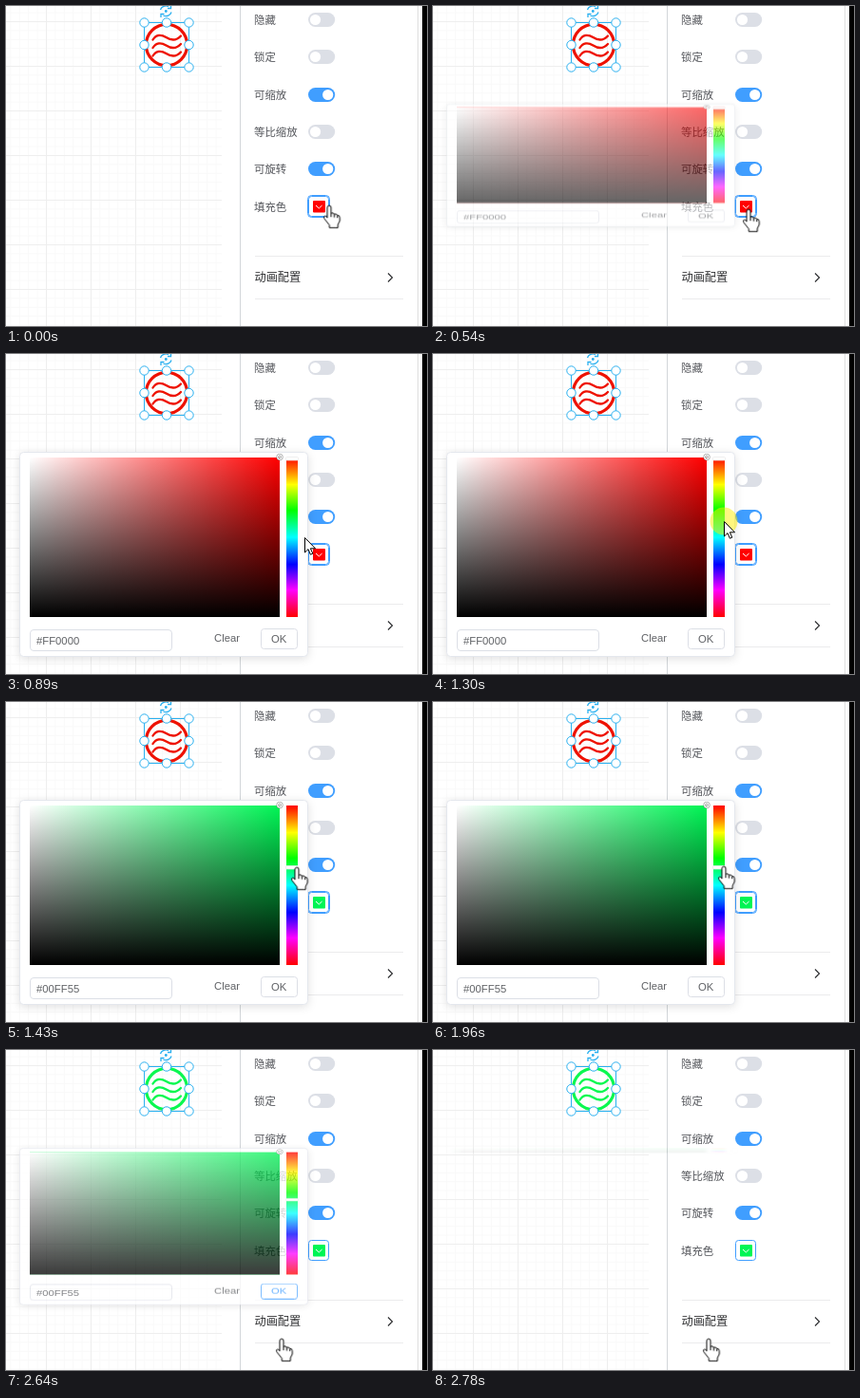
An HTML page for the animation above (3.53 s loop, 443 by 337 pixels).

```html
<!DOCTYPE html>
<html lang="zh-CN">
<head>
<meta charset="utf-8">
<title>Fill colour picker</title>
<style>
  html, body { margin: 0; width: 100%; height: 100%; overflow: hidden; background: #fff; }
  svg { display: block; width: 443px; height: 337px; }
  text { font: 11.4px "Noto Sans CJK SC", "Noto Sans CJK", "Noto Sans", sans-serif; fill: #55575c; }
  .popup text { font: 11.3px "Liberation Sans", Arial, sans-serif; fill: #606266; }
  .title { font-size: 12.2px; font-weight: 500; fill: #303133; }
  .off { fill: #dcdfe6; }
  .on { fill: #409eff; }
  .rule { stroke: #ebebed; }
  .box { fill: #fff; stroke: #dcdfe6; }
  .handles { fill: #fff; stroke: #29b0f0; }

  /* every animated part shares one stepped clock */
  .popup, .pick, .icon, .focus, .thumb, .hexOld, .hexNew, .ok, .popup .okText,
  .cursor, .hand, .arrow, .click { animation: 3530ms step-end infinite; }

  .popup { transform-origin: 0 103px; filter: drop-shadow(0 2px 5px rgba(0,0,0,.12)); animation-name: popup; }
  .pick { animation-name: pick; }
  .icon { animation-name: icon; }
  .focus { animation-name: focus; }
  .thumb { animation-name: thumb; }
  .hexOld { animation-name: before; }
  .hexNew { animation-name: after; }
  .ok { animation-name: ok; }
  .popup .okText { animation-name: okText; }
  .cursor { animation-name: cursor; }
  .hand { animation-name: hand; }
  .arrow { animation-name: arrow; }
  .click { animation-name: click; }

  @keyframes popup {
    0% { transform: scaleY(0); opacity: 0; }
    15.29% { transform: scaleY(.6); opacity: .6; }
    17.28% { transform: scaleY(.92); opacity: .92; }
    19.26% { transform: scaleY(.986); opacity: .986; }
    21.24% { transform: scaleY(.998); opacity: 1; }
    23.22% { transform: none; opacity: 1; }
    74.78% { transform: scaleY(.767); opacity: .767; }
    76.77% { transform: scaleY(.15); opacity: .15; }
    78.75%, 100% { transform: scaleY(.03); opacity: .05; }
  }
  @keyframes pick { 0% { fill: #f00; } 40.5%, 100% { fill: #00f555; } }
  @keyframes icon { 0% { stroke: #ee1200; } 74.78%, 100% { stroke: #0af850; } }
  @keyframes focus { 0% { opacity: 1; } 74.78%, 100% { opacity: 0; } }
  @keyframes thumb { 0% { transform: none; } 40.5%, 100% { transform: translateY(64px); } }
  @keyframes before { 0% { opacity: 1; } 40.5%, 100% { opacity: 0; } }
  @keyframes after { 0% { opacity: 0; } 40.5%, 100% { opacity: 1; } }
  @keyframes ok { 0% { stroke: #dcdfe6; } 67.13%, 100% { stroke: #409eff; } }
  @keyframes okText { 0% { fill: #606266; } 67.13%, 100% { fill: #409eff; } }
  @keyframes cursor {
    0% { transform: translate(340px, 211px); }
    1.98% { transform: translate(337px, 213px); }
    3.96% { transform: translate(333px, 214px); }
    5.66% { transform: translate(332px, 215px); }
    21.24% { transform: translate(329px, 212px); }
    23.22% { transform: translate(321px, 203px); }
    25.21% { transform: translate(314px, 193px); }
    27.19% { transform: translate(311px, 187px); }
    29.17% { transform: translate(308px, 181px); }
    30.87% { transform: translate(306px, 178px); }
    32.86% { transform: translate(306px, 176px); }
    40.5% { transform: translate(306px, 175px); }
    55.52% { transform: translate(306px, 174px); }
    57.5% { transform: translate(306px, 181px); }
    59.49% { transform: translate(304px, 202px); }
    61.18% { transform: translate(300px, 231px); }
    63.17% { transform: translate(296px, 262px); }
    65.15% { transform: translate(293px, 284px); }
    67.13% { transform: translate(291px, 298px); }
    69.12%, 100% { transform: translate(290px, 305px); }
  }
  @keyframes hand { 0% { opacity: 1; } 23.22% { opacity: 0; } 40.5%, 100% { opacity: 1; } }
  @keyframes arrow { 0% { opacity: 0; } 23.22% { opacity: 1; } 40.5%, 100% { opacity: 0; } }
  @keyframes click {
    0% { opacity: 0; } 11.33% { opacity: .5; } 15.29% { opacity: 0; }
    36.82% { opacity: .5; } 40.5% { opacity: 0; }
    71.1% { opacity: .5; } 74.78%, 100% { opacity: 0; }
  }
</style>
</head>
<body>
<svg viewBox="0 0 443 337">
  <defs>
    <pattern id="minor" x="42" y="16" width="9.4" height="9.4" patternUnits="userSpaceOnUse">
      <path d="M.5 0V9.4M0 .5H9.4" stroke="#f9f9f9"/>
    </pattern>
    <pattern id="major" x="42" y="16" width="47" height="47" patternUnits="userSpaceOnUse">
      <path d="M.5 0V47M0 .5H47" stroke="#eee"/>
    </pattern>
    <linearGradient id="white">
      <stop stop-color="#fff"/><stop offset="1" stop-color="#fff" stop-opacity="0"/>
    </linearGradient>
    <linearGradient id="black" x2="0" y2="1">
      <stop stop-opacity="0"/><stop offset="1"/>
    </linearGradient>
    <linearGradient id="hue" x2="0" y2="1">
      <stop stop-color="#f00"/><stop offset=".17" stop-color="#ff0"/>
      <stop offset=".33" stop-color="#0f0"/><stop offset=".5" stop-color="#0ff"/>
      <stop offset=".67" stop-color="#00f"/><stop offset=".83" stop-color="#f0f"/>
      <stop offset="1" stop-color="#f00"/>
    </linearGradient>
    <g id="off"><rect class="off" width="28.2" height="15" rx="7.5"/><circle cx="7.5" cy="7.5" r="5.6" fill="#fff"/></g>
    <g id="on"><rect class="on" width="28.2" height="15" rx="7.5"/><circle cx="20.7" cy="7.5" r="5.6" fill="#fff"/></g>
    <path id="wave" d="M154.5 35.5C158 30 163 29.5 168.500 33S179 37 184 31.5"/>
    <circle id="dot" r="4.7"/>
  </defs>

  <!-- canvas -->
  <rect width="227" height="337" fill="url(#minor)"/>
  <rect width="227" height="337" fill="url(#major)"/>
  <g class="icon" fill="none" stroke-linecap="round">
    <circle cx="169" cy="41" r="21.6" stroke-width="3.2"/>
    <g stroke-width="2.3"><use href="#wave"/><use href="#wave" y="8.5"/><use href="#wave" y="17"/></g>
  </g>
  <g class="handles">
    <rect x="145.5" y="17.5" width="47" height="47" fill="none"/>
    <use href="#dot" x="145.5" y="17.5"/><use href="#dot" x="169" y="17.5"/><use href="#dot" x="192.5" y="17.5"/>
    <use href="#dot" x="145.5" y="41"/><use href="#dot" x="192.5" y="41"/>
    <use href="#dot" x="145.5" y="64.5"/><use href="#dot" x="169" y="64.5"/><use href="#dot" x="192.5" y="64.5"/>
  </g>
  <g fill="none" stroke="#29b0f0" stroke-width="1.3">
    <path d="M162.5 4A6 5.5 0 0 1 171 .5M174 6.500A6 5.5 0 0 1 165.5 10M173.5-1V2.500H170M163 12V8.500H166.5"/>
    <circle cx="168.3" cy="5.5" r="1.4" fill="#29b0f0" stroke="none"/>
  </g>

  <!-- settings panel -->
  <path d="M246.5 0V337" stroke="#d2d6d9"/>
  <path d="M433.5 0V337" stroke="#dedede"/>
  <rect x="438" width="5" height="337"/>
  <text x="261" y="18.5">隐藏</text><use href="#off" x="318" y="7"/>
  <text x="261" y="57.5">锁定</text><use href="#off" x="318" y="46"/>
  <text x="261" y="97.5">可缩放</text><use href="#on" x="318" y="86"/>
  <text x="261" y="136.5">等比缩放</text><use href="#off" x="318" y="125"/>
  <text x="261" y="176">可旋转</text><use href="#on" x="318" y="164"/>
  <text x="261" y="215.5">填充色</text>
  <rect class="focus" x="317.5" y="199.5" width="23" height="23" rx="4" fill="none" stroke="#409eff"/>
  <rect x="318.5" y="200.5" width="21" height="21" rx="3" fill="#fff" stroke="#409eff"/>
  <rect class="pick" x="323" y="205" width="13" height="12.5" rx="1"/>
  <path d="M326 210l3.300 3 3.300-3" fill="none" stroke="#fff"/>
  <path class="rule" d="M262 263.5H418M262 308.5H418"/>
  <text class="title" x="261.500" y="289.5">动画配置</text>
  <path d="M402 281.5l4.500 4.500-4.500 4.500" fill="none" stroke="#303133" stroke-width="1.2"/>

  <!-- colour picker -->
  <g class="popup">
    <rect x="14.5" y="103.5" width="303" height="215" rx="4" fill="#fff" stroke="#e4e7ed"/>
    <rect class="pick" x="25" y="109" width="263" height="168"/>
    <rect x="25" y="109" width="263" height="168" fill="url(#white)"/>
    <rect x="25" y="109" width="263" height="168" fill="url(#black)"/>
    <circle cx="288" cy="108.5" r="2.3" fill="none" stroke="#888" stroke-width="2.4"/>
    <circle cx="288" cy="108.5" r="2.3" fill="none" stroke="#fff" stroke-width="1.2"/>
    <rect x="295" y="109" width="12" height="168" fill="url(#hue)"/>
    <rect class="thumb" x="294.5" y="108.5" width="13" height="3.5" rx="1" fill="#fff" stroke="#e8e8e8" stroke-width=".7"/>
    <rect class="box" x="25.5" y="290.5" width="149" height="22" rx="3.5"/>
    <text class="hexOld" x="32" y="306">#FF0000</text>
    <text class="hexNew" x="32" y="306">#00FF55</text>
    <text x="219" y="303">Clear</text>
    <rect class="box ok" x="268.5" y="289.5" width="38" height="21" rx="3"/>
    <text class="okText" x="279" y="303.5">OK</text>
  </g>

  <!-- pointer -->
  <g class="cursor">
    <circle class="click" r="14.5" fill="#fe0"/>
    <g class="hand" transform="translate(.3 -.8)" fill="#fff" stroke="#000" stroke-linejoin="round">
      <path d="M-2.200 2a2 2 0 0 1 4 0V8q3-.8 3.400 1 2.800-.6 3.200 1.200 2.600 0 2.600 2.400V16L9 20V23.300H0V20.500L-5.500 13.500q-.8-2.400 1-2.600 1.200 0 2.300 2z"/>
      <path d="M1.800 8V12M5.200 9V12.500M8.400 10.200V13" fill="none"/>
    </g>
    <path class="arrow" d="M.5.5V16L4 12.600 6.400 18.200 8.800 17.200 6.400 11.800H11.500Z" fill="#fff" stroke="#000"/>
  </g>
</svg>
</body>
</html>
```
